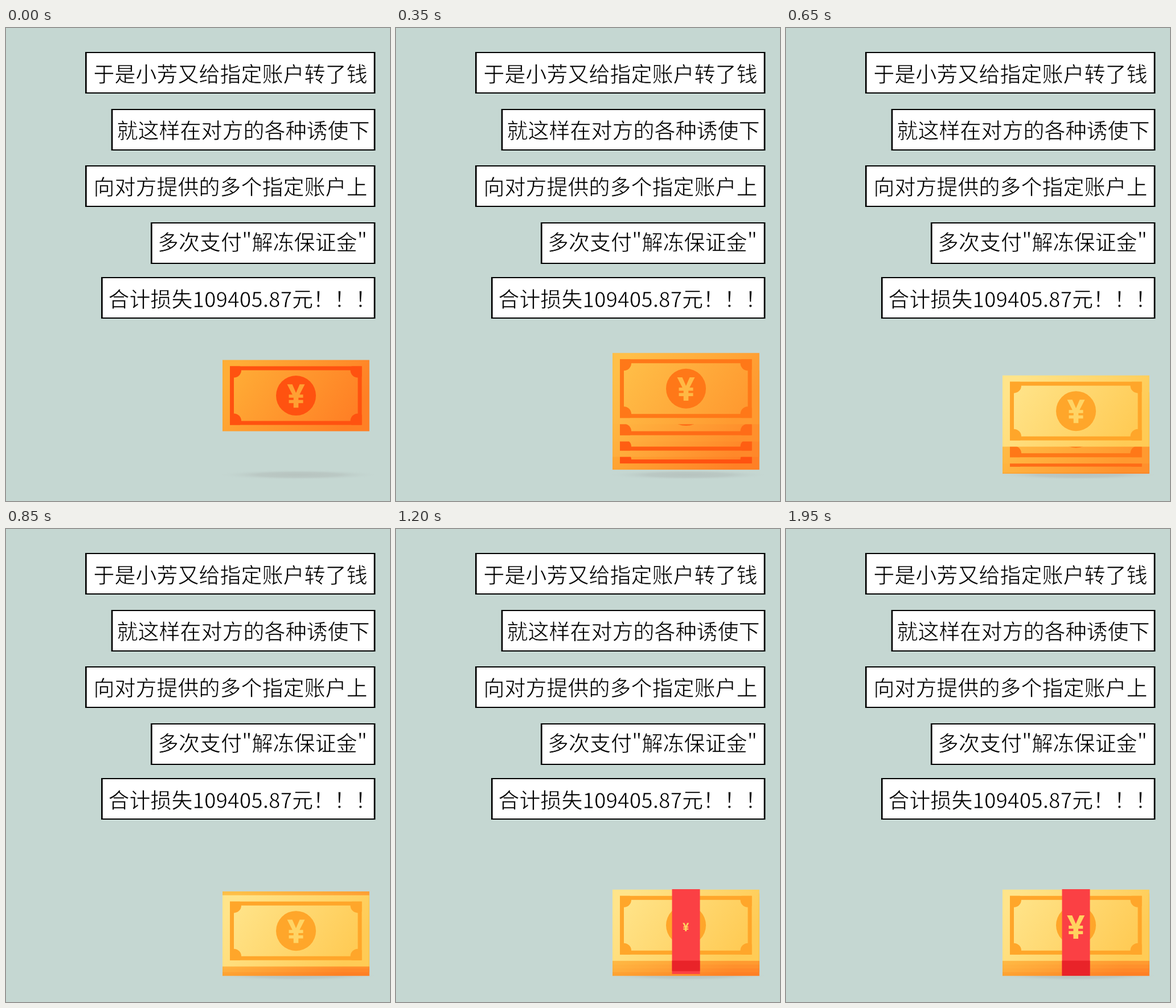
Write an HTML page that moves like this. It is 674 by 830 pixels and loops after 2 s.

```html
<!DOCTYPE html>
<html lang="zh-CN">
<head>
<meta charset="utf-8">
<title>转账损失</title>
<style>
  html, body { margin: 0; width: 100%; height: 100%; overflow: hidden; background: #c5d7d2; }
  svg { display: block; width: 674px; height: 830px; }
  /* the white outline thins the strokes to a light weight */
  text {
    font: 300 37px "Noto Sans CJK SC", "Noto Sans CJK", "Noto Sans", sans-serif;
    fill: #000; stroke: #fff; stroke-width: .7px;
  }
</style>
</head>
<body>
<svg id="stage" viewBox="0 0 674 830">
  <defs>
    <radialGradient id="shade">
      <stop offset="0" stop-color="#b7c3bf"/>
      <stop offset=".5" stop-color="#b9c6c2" stop-opacity=".85"/>
      <stop offset="1" stop-color="#c5d7d2" stop-opacity="0"/>
    </radialGradient>
    <path id="yuan" d="M-15.5-20.5H-6.5L0-5.5L6.5-20.5H15.5L6.3-2.5H12.5V3H4.3V7H12.5V12.5H4.3V20.5H-4.3V12.5H-12.5V7H-4.3V3H-12.5V-2.5H-6.3Z"/>
    <clipPath id="frameClip"><rect x="13" y="11" width="231.5" height="103"/></clipPath>
  </defs>
  <rect width="674" height="830" fill="#c5d7d2"/>
  <g id="captions"></g>
  <ellipse cx="513" cy="784" rx="146" ry="9" fill="url(#shade)"/>
  <g id="bills"></g>
  <g id="band">
    <rect id="front" x="484.5" y="632" width="49" fill="#fb4044"/>
    <rect id="fold" x="484.5" y="757.5" width="49" fill="#e92329"/>
    <use id="mark" href="#yuan" fill="#ffd25f"/>
  </g>
</svg>
<script>
const LOOP = 2000, STEP = 50;
const OVERSHOOT = 10.2;
const $ = id => document.getElementById(id);

// left edge, top edge, text start, baseline
const captions = [
  [139, 42, 153.5, 94.8, '于是小芳又给指定账户转了钱'],
  [184.7, 142, 194.5, 193.8, '就这样在对方的各种诱使下'],
  [139, 241, 153.5, 293, '向对方提供的多个指定账户上'],
  [254, 341, 266, 389.8, '多次支付"解冻保证金"'],
  [167, 437, 179.5, 489.8, '合计损失109405.87元！！！']
];

// shown: first visible time; landing: time of the lowest point; speed in px per ms
const bills = [
  { shown: 0,   landing: 450, speed: .193, light: '#ffad36', dark: '#ff8025', ink: '#ff5210', sign: '#ffa033' },
  { shown: 100, landing: 495, speed: .243, light: '#ffb942', dark: '#ff8829', ink: '#ff5e12', sign: '#ffa93a' },
  { shown: 250, landing: 592, speed: .23,  light: '#ffbc45', dark: '#ff902c', ink: '#ff6c17', sign: '#ffb040' },
  { shown: 350, landing: 695, speed: .23,  light: '#ffbf48', dark: '#ff9a30', ink: '#ff7818', sign: '#ffb844' },
  { shown: 450, landing: 795, speed: .23,  light: '#ffe48a', dark: '#ffcb55', ink: '#ffa62a', sign: '#ffd465' }
];

$('captions').innerHTML = captions.map(([x, y, tx, ty, words]) => `
  <rect x="${x}" y="${y}" width="${648.3 - x}" height="73" fill="#000"/>
  <rect x="${x + 2.7}" y="${y + 2}" width="${648.3 - x - 5.4}" height="69" fill="#fff"/>
  <text x="${tx}" y="${ty}">${words}</text>`).join('');

const corners = [[20, 18], [237.5, 18], [20, 107], [237.5, 107]]
  .map(([x, y]) => `<circle cx="${x}" cy="${y}" r="13"/>`).join('');

$('bills').innerHTML = bills.map((b, i) => `
  <linearGradient id="paper${i}" gradientUnits="userSpaceOnUse" x1="30" y1="0" x2="210" y2="125">
    <stop offset="0" stop-color="${b.light}"/><stop offset="1" stop-color="${b.dark}"/>
  </linearGradient>
  <g id="bill${i}">
    <rect width="257.8" height="125" fill="url(#paper${i})"/>
    <rect x="16.5" y="14.5" width="224.5" height="96" fill="none" stroke="${b.ink}" stroke-width="7"/>
    <g fill="${b.ink}" clip-path="url(#frameClip)">${corners}</g>
    <circle cx="129" cy="62.5" r="35" fill="${b.ink}"/>
    <use href="#yuan" x="129" y="63.2" fill="${b.sign}"/>
  </g>`).join('');

const clamp = (v, lo, hi) => Math.min(hi, Math.max(lo, v));
const smooth = x => { x = clamp(x, 0, 1); return x * x * (3 - 2 * x); };

// Offset from rest: steady approach, overshoot, small rebound, settle.
function settle(u, speed) {
  if (u < 0) return OVERSHOOT + speed * u;
  const recoil = -3.5;
  if (u < 155) return OVERSHOOT + (recoil - OVERSHOOT) * smooth((u - 45) / 110);
  return recoil * (1 - smooth((u - 155) / 105));
}

function draw(t) {
  bills.forEach((b, i) => {
    const y = 659.2 - 6.6 * i + settle(t - b.landing, b.speed);
    const el = $('bill' + i);
    el.setAttribute('transform', `translate(380 ${y.toFixed(2)})`);
    el.setAttribute('visibility', t >= b.shown ? 'visible' : 'hidden');
  });

  const reveal = clamp((t - 920) / 286, 0, 1);
  const bottom = 632 + 152 * reveal;
  const foldBottom = reveal < 1 ? bottom - 5 : 784;
  $('front').setAttribute('height', bottom - 632);
  $('fold').setAttribute('height', Math.max(0, foldBottom - 757.5));

  const scale = t < 1055 ? 0 : Math.max(0, 1 + settle(t - 1510, .24) / 100);
  $('mark').setAttribute('transform', `translate(508.7 698.5) scale(${scale.toFixed(4)})`);
}

const start = performance.now();
function tick() {
  const t = (performance.now() - start) % LOOP;
  draw(Math.floor(t / STEP) * STEP);
  requestAnimationFrame(tick);
}
tick();
</script>
</body>
</html>
```
